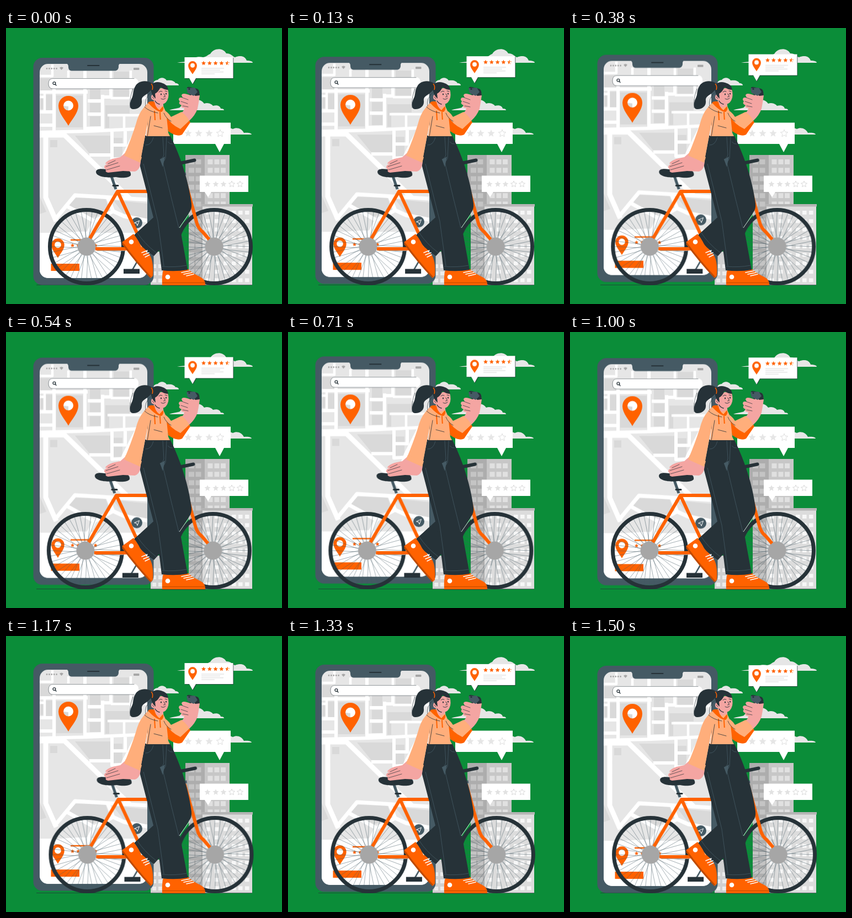
Recreate the animation shown at these times as an HTML page. Size 500 px wide and 500 px high, loop 1.54 s.

```html
<!DOCTYPE html>
<html lang="en">
<head>
<meta charset="utf-8">
<title>City bike</title>
<style>
html, body { margin: 0; width: 100%; height: 100%; overflow: hidden; background: #0b8d39; }
svg { display: block; width: 100vw; height: 100vh; }
.ink { fill: #263238; }
.slate { fill: #455a64; }
.hot { fill: #ff6200; }
.peach { fill: #ffae7b; }
.skin { fill: #f4a5a2; }
.pale { fill: #e6e6e6; }
.white { fill: #fff; }
.line { fill: none; stroke: #263238; stroke-linecap: round; stroke-linejoin: round; }
.seam { fill: none; stroke: #455a64; stroke-width: .8; }
.tube { fill: none; stroke: #ff6200; stroke-width: 6; stroke-linejoin: round; }
.road { fill: none; stroke: #fff; stroke-linejoin: round; }
.tint { fill: #d9d9d9; }
</style>
</head>
<body>
<svg viewBox="0 0 500 500" preserveAspectRatio="none">
  <defs>
    <clipPath id="screen"><rect x="61" y="65" width="195" height="388" rx="15"/></clipPath>
    <path id="pin" fill-rule="evenodd" d="M0 36C-6 25-18 13-18 0A18 18 0 0 1 18 0C18 13 6 25 0 36ZM-9-.5a9 9 0 1 0 18 0a9 9 0 1 0-18 0Z"/>
    <path id="note" d="M323.500 53H411.500V91H344L338 101.500L332 91H323.500Z"/>
    <g id="wheel">
      <path id="spokes" fill="none" stroke="#455a64" stroke-width=".5"/>
      <circle r="66.500" fill="none" stroke="#263238" stroke-width="7"/>
      <circle r="16.500" fill="#a6a6a6"/>
    </g>
  </defs>

  <g class="pale">
    <path d="M310 63C317 61 325 62 331 60C338 53 349 51 357 53C364 52 366 48 370 47C376 36 393 35 399 46C409 46 410 52 415 53C425 49 433 51 436 59C441 59 447 60 447 63Z"/>
    <path d="M262 104C267 98 270 94 275 94C279 89 287 89 291 95C300 94 305 96 307 100C311 100 313 102 313 104Z"/>
    <path d="M296 149C302 146 310 146 315 144C320 136 328 139 333 134C340 128 353 128 359 137C366 134 373 138 375 141C384 139 388 142 389 146C393 146 395 147 395 149Z"/>
    <path d="M372 193C385 181 401 178 411 183C418 179 427 182 431 190C440 189 445 191 445 193Z"/>
  </g>

  <g id="city"></g>
  <path d="M55 465.500H446" stroke="#263238" stroke-width=".7"/>

  <g id="bubbles">
    <path class="white" d="M303 171.500H407V210H395L387 225L379 210H303Z"/>
    <path class="white" d="M351 267.500H439V297H372L366 306.500L360 297H351Z"/>
  </g>

  <g id="phone">
    <rect class="slate" x="49.500" y="54" width="218" height="411.500" rx="16"/>
    <g clip-path="url(#screen)">
      <rect class="pale" x="61" y="65" width="195" height="388"/>
      <g id="blocks" class="tint">
        <path d="M125 195H189V227H151Z"/>
        <path d="M126 308L180 309L188 331L152 345L113 322ZM61 305L73 333L61 337ZM194 312L256 318V346L213 336Z"/>
        <path d="M180 140H224V155H187V181H180ZM220 228L256 196V238L232 252Z"/>
      </g>
      <g class="road">
        <path stroke-width="6" d="M61 189L148 187L256 182M87 109V187M143 66V187M175 121V184M61 116H87M143 182L176 181M87 116H148M61 152H87V176H61M148 132H175V125H190V109M148 156H175"/>
        <path stroke-width="4.500" d="M70 117V151M190 127H256M214 158V181M184 158H256M113 77V90M84 66V87L61 87M190 77V91M226 77V135M61 125H70"/>
        <path stroke-width="9" d="M72 193V307L91 350M102 190L224 309M61 194H107M256 151L215 230L206 254"/>
        <path stroke-width="6" d="M192 188V238L220 236M192 212H216V187M151 230H192"/>
        <path stroke-width="7" d="M87 349L125 303L256 311M109 322L160 350L194 332L184 306M192 331L214 341L256 349M160 350L149 372"/>
      </g>
      <path class="white" d="M61 371H85C120 371 140 366 165 371H256V453H61Z"/>
    </g>
    <path class="slate" d="M106 64H211C204 64 204 67 204 70C204 75 201 77.500 197 77.500H120C115 77.500 113 75 113 70C113 67 112 64 106 64Z"/>
    <path class="line" stroke-width="2" d="M148 68H168.500"/>
    <g fill="#a6a6a6">
      <path d="M74 73.500H92" stroke="#a6a6a6" stroke-width="2.800" stroke-dasharray="0 4.400" stroke-linecap="round"/>
      <path d="M97 72Q100.500 69 104 72L100.500 76Z"/>
      <rect x="231" y="72" width="10.500" height="4" rx="1"/>
    </g>
    <rect class="white" x="77" y="91" width="163" height="19" rx="8"/>
    <path class="line" stroke-width=".5" d="M232 110H85Q77 110 77 101Q77 91.500 85 91.500H232"/>
    <path class="line" stroke-width="1.400" d="M85 100a2.400 2.400 0 1 0 4.800 0a2.400 2.400 0 1 0-4.800 0M89.300 102L91 104"/>
    <path class="white" d="M104 141A9.300 9.300 0 1 1 113 150V142Z"/>
    <use href="#pin" class="hot" x="113" y="141"/>
    <circle class="slate" cx="237" cy="353" r="10"/>
    <path d="M232.500 353L241.500 349L238 358L236.500 354Z" fill="none" stroke="#fff" stroke-width="1"/>
    <use href="#pin" class="hot" transform="translate(94 393) scale(.65)"/>
    <path d="M117 384H151" stroke="#ff6200" stroke-width="2.500"/>
    <rect class="hot" x="81.500" y="427" width="51.500" height="13"/>
  </g>

  <g id="bike">
    <use href="#wheel" x="146" y="396"/>
    <use href="#wheel" x="377" y="396"/>
    <path class="tube" d="M152 381L202 296H328M202 296L253 405M162 400H250"/>
    <path d="M165 403.500H215" stroke="#a6a6a6" stroke-width="1"/>
    <path class="tube" d="M322 268L336 318L345 351Q348 363 356 369L368 383"/>
    <path d="M319 265L326 264" stroke="#455a64" stroke-width="5"/>
    <path d="M190 266L199 292" stroke="#455a64" stroke-width="5"/>
    <path class="line" stroke-width="3" d="M194 285.500H203"/>
    <path class="line" stroke-width="6" d="M310 246L341.500 239.500"/>
    <path class="ink" d="M163 261C163 256 169 254 181 256C194 258 205 258 218 256C224 258 227 262 226 267C222 272 209 272 199 270C184 272 164 270 163 261Z"/>
    <path d="M247 407L229 438" stroke="#455a64" stroke-width="2.500"/>
    <rect class="ink" x="213" y="436.500" width="29" height="8.500"/>
  </g>

  <g id="card">
    <use href="#note" class="ink" x=".7" y=".8"/>
    <use href="#note" class="white"/>
    <use href="#pin" class="hot" transform="translate(338 68) scale(.44)"/>
    <path d="M354 73H395M354 76.300H388M354 79.700H394M354 83H378" stroke="#d8d8d8" stroke-width="1"/>
  </g>

  <g id="woman">
    <!-- crossed leg -->
    <path class="ink" d="M280 198L298 196C312 224 330 270 336 318Q337 328 332 334L314 362L268 413Q245 399 231 376L276 335Z"/>
    <path class="hot" d="M210 388L231 373Q241 385 247 401L259 409Q268 421 266 449L262 453Q253 442 243 430Z"/>
    <path d="M211 390Q236 424 262 451.500" fill="none" stroke="#bf4a00" stroke-width="3"/>
    <circle class="white" cx="227" cy="387.500" r="4.300"/>
    <path d="M246 407L256 403M249 411L259 407M252 415L260 411" stroke="#fff" stroke-width="1.600" stroke-linecap="round"/>
    <path class="seam" d="M238 371Q250 390 272 407"/>
    <!-- standing leg -->
    <path class="hot" d="M285 438L330 437Q339 445 352 451Q362 456 361 466L283 466Q282 449 285 438Z"/>
    <path d="M283 461.500H361" stroke="#bf4a00" stroke-width="1"/>
    <path class="line" stroke-width=".8" d="M283 466.500H361"/>
    <circle class="white" cx="293" cy="451" r="4.300"/>
    <path d="M318 443L333 440M322 446L337 443M327 449L340 446" stroke="#fff" stroke-width="1.600" stroke-linecap="round"/>
    <path class="ink" d="M252 195H297L300 212L289 244L313 350L329 438Q307 442 282 439Q276 385 267 343L242 247Z"/>
    <path class="seam" d="M284 197L286 229Q285 236 279 238Q284 248 289 236L291 197M284 243L300 310L313 362M249 246L275 350L286 431M283 432Q307 434 327 430M252 212Q263 213 267 198M293 206Q297 211 302 210"/>
    <path class="slate" d="M279 238L288 233L284 252Z"/>
    <path d="M314 362L332 336" stroke="#fff" stroke-width=".8"/>
    <!-- raised arm -->
    <path class="skin" d="M317 154Q323 150 323 145L333 123L343 114Q350 115 351 122Q349 136 347 146Q343 158 332 168Z"/>
    <path class="peach" d="M282 147Q292 150 299 161L318 152Q329 160 333 170L319 193Q307 199 294 183Z"/>
    <path class="hot" d="M288 157Q298 175 316 183L332 168L334 171L319 193Q309 198 294 187Z"/>
    <path class="ink" d="M328 108Q329 106 333 107L346 110Q349 111 350 115L351 122L343 123L340 120L333 122Z"/>
    <path class="slate" d="M327 109L342 108L347 116L340 123L329 118Z"/>
    <circle class="ink" cx="332" cy="110.500" r="1.600"/>
    <path class="skin" d="M318 122Q319 117 328 120L341 124L334 146L321 145Q315 143 318 140Q311 137 315 133Q311 129 315 126L320 126Z"/>
    <path class="line" stroke-width=".7" d="M319 126L330 130M317 133L329 137M320 141L330 143"/>
    <!-- hoodie -->
    <path class="skin" d="M268 130H284L286 149L276 154L266 145Z"/>
    <path class="peach" d="M249 145Q256 134 268 133L274 145L284 141Q290 149 291 161L294 190L297 196H254L257 169L243 244L214 231Q227 200 235 175Q240 155 249 145Z"/>
    <path class="hot" d="M257 135Q263 131 269 134Q270 143 278 149L284 142Q287 147 282 152Q272 152 257 135ZM268 150h2l1 17h-2ZM278 152h1.800l1 14h-2Z"/>
    <path class="line" stroke-width=".8" d="M262 160L256 197L244 243M251 143Q259 151 275 154M268 177L283 181M217 227Q231 232 243 238M286 154Q290 164 299 169"/>
    <!-- resting hand -->
    <path class="skin" d="M216 226L244 241Q243 258 233 260L212 259L185 262Q179 261 181 257L178 253Q177 249 184 246L180 246Q181 241 193 237L207 234Z"/>
    <path class="peach" d="M214 231L217 223L246 234L243 244Z"/>
    <path class="line" stroke-width=".7" d="M181 251L203 244M182 257L206 250M185 246L198 240"/>
    <!-- head -->
    <path class="ink" d="M266 101C255 93 239 95 234 106C229 114 232 120 227 129C223 139 224 148 231 147C241 147 247 140 246 132C245 125 250 123 256 119C262 114 266 109 266 101Z"/>
    <path d="M230 110Q223 128 225 145M262 117Q250 128 253 142" fill="none" stroke="#263238" stroke-width=".6"/>
    <path class="skin" d="M265 112L291 107Q296 116 294 126Q291 137 283 138Q275 138 270 131Q262 131 263 124Q264 120 268 121Z"/>
    <path class="ink" d="M263 103Q270 96 281 99Q293 102 294 112Q286 112 280 107Q276 116 270 119L271 128L267 124Q260 113 263 103Z"/>
    <path d="M263 101Q267 105 265 112" stroke="#ff6200" stroke-width="1.500" fill="none"/>
    <ellipse class="ink" cx="281" cy="120" rx="1.100" ry="1.600"/>
    <ellipse class="ink" cx="290" cy="119" rx="1.100" ry="1.600"/>
    <path class="line" stroke-width=".9" d="M277 116Q280 113 283 115M288 114L292 115M286 119L288.500 124L285.500 125M281 128Q285 131 289 127M265 125L268 128"/>
    <path class="line" stroke-width="1.300" d="M270 132Q273 137 278 138"/>
  </g>
</svg>
<script>
const $ = id => document.getElementById(id);

function add(parent, tag, attrs) {
  const el = document.createElementNS('http://www.w3.org/2000/svg', tag);
  for (const k in attrs) el.setAttribute(k, attrs[k]);
  return parent.appendChild(el);
}

const rect = (parent, x, y, width, height, fill) =>
  add(parent, 'rect', { x, y, width, height, fill });

function star(parent, x, y, r, fill, stroke = 'none') {
  let pts = '';
  for (let i = 0; i < 10; i++) {
    const a = i * Math.PI / 5 - Math.PI / 2, q = i % 2 ? r * .46 : r;
    pts += `${(x + q * Math.cos(a)).toFixed(2)},${(y + q * Math.sin(a)).toFixed(2)} `;
  }
  return add(parent, 'polygon', { points: pts, fill, stroke, 'stroke-width': .8 });
}

function windows(xs, w, y, h, step, end, fill) {
  for (; y < end; y += step) for (const x of xs) rect($('city'), x, y, w, h, fill);
}

// Buildings
const city = $('city');
rect(city, 262, 405, 38, 61, '#d0d0d0');
windows([265, 276], 7, 428, 7, 13, 460, '#ececec');
rect(city, 325, 230, 36, 90, '#adadad');
rect(city, 331, 320, 30, 146, '#adadad');
rect(city, 360, 230, 45, 236, '#c7c7c7');
windows([331, 343.5], 10, 238, 9, 15.3, 455, '#c4c4c4');
windows([365.5, 377.5, 389], 9, 238, 9, 15.3, 318, '#e0e0e0');
rect(city, 356, 321, 90, 145, '#dcdcdc');
rect(city, 354, 319, 93, 4.5, '#b5b5b5');
windows([362, 378, 394, 409, 421, 433], 7.5, 331, 7, 15.3, 460, '#f7f7f7');

// City blocks on the map
for (const [x, y, w, h] of [
  [62, 127, 7, 20], [72, 121, 12, 28], [91, 122, 48, 58], [152, 109, 19, 20],
  [152, 136, 19, 17], [152, 160, 19, 18], [80, 203, 13, 13], [195, 199, 16, 10],
  [195, 215, 16, 19], [62, 91, 22, 22], [195, 79, 28, 46]
]) rect($('blocks'), x, y, w, h, '#d9d9d9');

// Ratings
const bubbles = $('bubbles'), card = $('card');
[330, 349, 368, 388].forEach((x, i) =>
  star(bubbles, x, 191, 7, i < 3 ? '#e6e6e6' : '#fff', i < 3 ? 'none' : '#d6d6d6'));
[365, 380, 394, 409, 424].forEach((x, i) =>
  star(bubbles, x, 283, 5.8, i < 3 ? '#e2e2e2' : '#fff', i < 3 ? 'none' : '#d0d0d0'));
for (let i = 0; i < 5; i++) {
  star(card, 358 + i * 10.8, 63.8, 4.3, '#ff6200');
  star($('phone'), 120.5 + i * 10.4, 394, 3.8, '#ff6200');
}
add(card, 'path', { d: 'M401.700 61L402.500 63L404.500 63.300L403 64.800L403.400 66.800L401.700 66Z', fill: '#fff' });

// Spokes leave the hub at alternating slants
let spokes = '';
for (let i = 0; i < 40; i++) {
  const a = i * Math.PI / 20, b = a + (i % 2 ? .15 : -.15);
  spokes += `M${(15 * Math.cos(b)).toFixed(1)} ${(15 * Math.sin(b)).toFixed(1)}L${(64 * Math.cos(a)).toFixed(1)} ${(64 * Math.sin(a)).toFixed(1)}`;
}
$('spokes').setAttribute('d', spokes);

// Motion: [time in ms, offset in px]
const LOOP = 1540;
const lift = [[0, 0], [130, -1.8], [380, -5.4], [710, -9.7], [770, -10.3], [1000, -6.7], [1170, -4], [1500, -.1], [1540, 0]];
const roll = [[0, 0], [130, -.9], [380, -1.7], [710, -2.6], [900, -2.5], [1000, -2.1], [1090, 1.6], [1170, 1.5], [1500, .1], [1540, 0]];

function play(id, steps, axis) {
  $(id).animate(
    steps.map(([t, v]) => ({ offset: t / LOOP, transform: `translate${axis}(${v}px)` })),
    { duration: LOOP, iterations: Infinity }
  ).startTime = 0;
}
play('phone', lift, 'Y');
play('card', lift, 'Y');
play('bike', roll, 'X');
</script>
</body>
</html>
```
